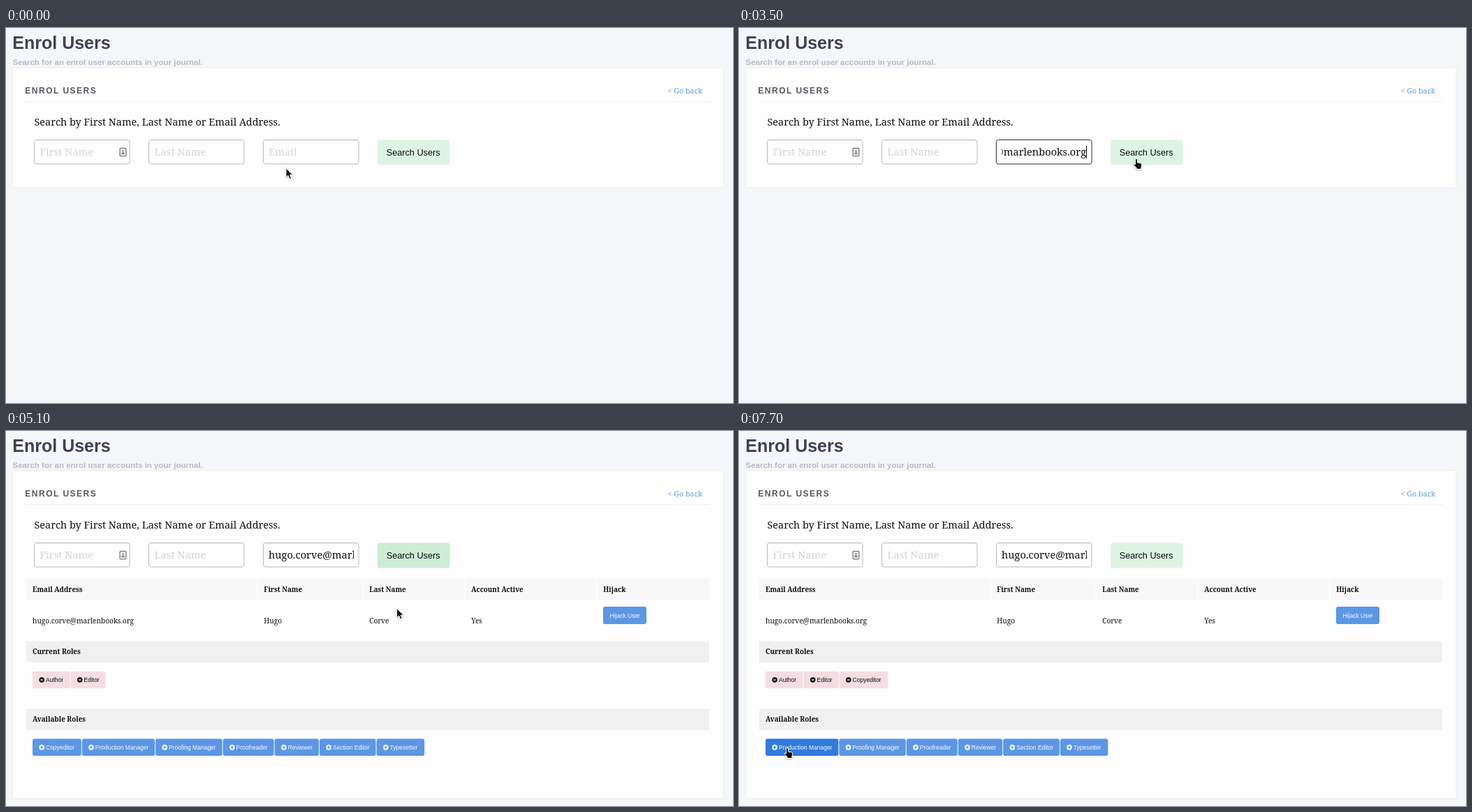
These frames come from a looping animation (1041x538 px, 8 s). An HTML page:

```html
<!DOCTYPE html>
<html lang="en">
<head>
<meta charset="utf-8">
<title>Enrol Users</title>
<style>
html, body { margin: 0; width: 100%; height: 100%; overflow: hidden; background: #f4f6fa; }
svg { display: block; width: 100%; height: 100%; }
text { white-space: pre; }
.sans { font-family: "Liberation Sans", Arial, sans-serif; }
.serif { font-family: "Noto Serif", serif; fill: #0f0f0f; }
.bold { font-weight: bold; }
.field { font-size: 14.6px; }
.hint { fill: #d3d3d8; }
.head { font-size: 9.8px; font-weight: bold; }
.cell { font-size: 10.15px; }
.small { font-size: 8.5px; }
.list { font-family: "Noto Sans", "Open Sans", sans-serif; font-size: 9.67px; fill: #333; }
</style>
</head>
<body>
<svg viewBox="0 0 1041 538" xmlns="http://www.w3.org/2000/svg">
  <defs>
    <filter id="soft" x="-20%" y="-20%" width="140%" height="150%">
      <feDropShadow dx="0" dy="1" stdDeviation="1.6" flood-color="#000" flood-opacity=".3"/>
    </filter>
    <filter id="glow" x="-10%" y="-30%" width="120%" height="160%">
      <feDropShadow dx="0" dy="0" stdDeviation="1.8" flood-color="#777" flood-opacity=".55"/>
    </filter>
    <filter id="faint" x="-3%" y="-5%" width="106%" height="110%">
      <feDropShadow dx="0" dy="0" stdDeviation="1.8" flood-color="#9aa4b8" flood-opacity=".22"/>
    </filter>
    <clipPath id="inner"><path d="M376 162H498V194H376Z"/></clipPath>
  </defs>
  <rect width="1041" height="538" fill="#f4f6fa"/>
  <text class="sans bold" x="9.3" y="30" font-size="25" fill="#3d4351">Enrol Users</text>
  <text class="sans bold" x="9.5" y="53" font-size="11.5" fill="#b7babf">Search for an enrol user accounts in your journal.</text>
  <rect id="card" x="10" y="57.5" width="1016.5" height="171" fill="#fefefe" filter="url(#faint)"/>
  <text class="sans bold" x="27.3" y="94" font-size="12" letter-spacing="1.5" fill="#55585f">ENROL USERS</text>
  <text class="serif" x="947.5" y="94" font-size="10.75" style="fill:#5f9fe3">&lt; Go back</text>
  <path d="M27.5 105.5H1008" stroke="#efefef"/>
  <text class="serif" x="40.5" y="140" font-size="14.45">Search by First Name, Last Name or Email Address.</text>
  <g id="form"></g>
  <g id="table"></g>
  <g id="popup"></g>
  <g id="cursor" stroke="#fff" fill="#111" filter="url(#soft)"><path stroke-width="1" stroke-linejoin="round"/></g>
</svg>
<script>
const LOOP = 8000, STEP = 100;
const FIRST = "hugo", LAST = "corve", LOGIN = FIRST + "." + LAST;
const EMAIL = LOGIN + "@marlenbooks.org";
const PALE = [222, 244, 227], MID = [180, 229, 191], DEEP = [170, 223, 181];

// Cursor moves: start, end, control point, end point (quadratic curve)
const START = [401, 201];
const MOVES = [
  [200, 900, [415, 200], [439, 186]],
  [2600, 2700, [438, 200], [436, 217]],
  [2900, 3500, [500, 235], [569, 188]],
  [3500, 3800, [575, 182], [578, 178]],
  [4800, 5600, [560, 300], [472, 414]],
  [5700, 6500, [300, 530], [69, 455]]
];
const ARROW = "M0 0V13.4L3 10.6L5.2 15.6L7.6 14.6L5.5 9.8H9.6Z";
const HAND = "M-1.5 1Q-1.5-.5 0-.5Q1.5-.5 1.5 1V5L6.4 6Q8 6.4 7.8 8L7 12V14.4H0V12.6L-4 8.6Q-4.5 6.8-3 7L-1.5 8Z";

const ROLES = [["Copyeditor", 69.8], ["Production Manager", 104.3], ["Proofing Manager", 95.5],
  ["Proofreader", 73], ["Reviewer", 63.4], ["Section Editor", 80.6], ["Typesetter", 68.6]];
const HELD = [["Author", 53.5], ["Editor", 50.1]];
const COLUMNS = [[29, 359.5, "Email Address", EMAIL], [361, 510.5, "First Name", "Hugo"],
  [512, 656.5, "Last Name", "Corve"], [658, 845, "Account Active", "Yes"], [847, 1007, "Hijack", ""]];

const $ = id => document.getElementById(id);
const rect = (x, y, w, h, fill, more = "") =>
  `<rect x="${x}" y="${y}" width="${w}" height="${h}" fill="${fill}" ${more}/>`;
const text = (x, y, cls, s, more = "") => `<text class="${cls}" x="${x}" y="${y}" ${more}>${s}</text>`;
const mix = (a, b, k) => `rgb(${a.map((v, i) => Math.round(v + (b[i] - v) * k))})`;
const clamp = v => Math.max(0, Math.min(1, v));

function pointer(t) {
  let from = START;
  for (const [t0, t1, mid, to] of MOVES) {
    if (t <= t0) break;
    const u = clamp((t - t0) / (t1 - t0)), k = u * u * (3 - 2 * u), r = 1 - k;
    from = from.map((v, i) => r * r * v + 2 * r * k * mid[i] + k * k * to[i]);
  }
  return from;
}

const inside = ([px, py], x, y, w, h) => px >= x && px <= x + w && py >= y && py <= y + h;

function inputBox(x, focus) {
  const ring = focus ? 'stroke="#444" filter="url(#glow)"' : 'stroke="#b9b9bd"';
  return rect(x, 160.5, 136.5, 34.5, "#fefefe", `rx="3" ${ring}`) +
    (focus ? "" : `<path d="M${x + 2} 161.7h132.5" stroke="#efeff1"/>`);
}

function contactIcon() {
  return rect(163.2, 172.6, 8.6, 11.2, "#fff", 'rx="1" stroke="#8b8b8b" stroke-width="1.6"') +
    '<circle cx="167.5" cy="176.2" r="1.3" fill="#8b8b8b"/>' +
    '<path d="M165.2 181.4v-2.2q2.3-2.2 4.6 0v2.2z" fill="#8b8b8b"/>';
}

function buttonColor(t) {
  if (t < 3500) return mix(PALE, PALE, 0);
  if (t < 4300) return mix(PALE, DEEP, clamp((t - 3500) / 300));
  if (t < 4500) return mix(MID, MID, 0);
  return mix(DEEP, PALE, clamp((t - 4900) / 300));
}

function typed(t) {
  if (t >= 3000) return EMAIL;
  return t < 1600 ? "" : FIRST.slice(0, Math.floor((t - 1600) / 100) + 1);
}

function drawForm(t) {
  const focus = t >= 900 && t < 4000, value = typed(t), end = focus && t >= 3000;
  let s = inputBox(40.5) + inputBox(204.5) + inputBox(368.5, focus) +
    text(48.5, 183, "serif field", "First Name", 'style="fill:#d3d3d8"') +
    text(212.5, 183, "serif field", "Last Name", 'style="fill:#d3d3d8"');
  if (t < 4300 || t >= 4500) s += contactIcon();
  s += value
    ? `<g clip-path="url(#inner)">${text(end ? 497 : 376, 183, "serif field", value,
        `id="value" text-anchor="${end ? "end" : "start"}"`)}</g>`
    : text(376, 183, "serif field", "Email", 'style="fill:#d3d3d8"');
  s += rect(532, 160.5, 103.5, 36, buttonColor(t), 'rx="3"') +
    text(544.7, 183, "sans", "Search Users", 'font-size="12.7" fill="#0a0a0a"');
  $("form").innerHTML = s;
  if (focus) {
    const x = end ? 497 : 376 + (value ? $("value").getComputedTextLength() : 0);
    $("form").insertAdjacentHTML("beforeend", rect(x, 169, 1, 18, "#111"));
  }
}

function roleRow(list, y, minus, at) {
  let x = 38, s = "", hit = false;
  for (const [name, w] of list) {
    const over = !minus && inside(at, x, y, w, 24.5);
    hit = hit || over;
    const fill = minus ? "#f6dde3" : over ? "#2f7bdd" : "#5b97e5";
    const ink = minus ? "#0a0a0a" : "#fefefe", cx = x + 13.2, cy = y + 12.3;
    s += rect(x, y, w, 24.5, fill, 'rx="3"') +
      `<circle cx="${cx}" cy="${cy}" r="3.8" fill="${ink}"/>` +
      `<path d="M${cx - 2.2} ${cy}h4.4${minus ? "" : `M${cx} ${cy - 2.2}v4.4`}" stroke="${fill}" stroke-width="1.3"/>` +
      text(x + 19, y + 15.3, "sans small", name, `fill="${ink}"`);
    x += w + 1;
  }
  return [s, hit];
}

function drawTable(t, at) {
  const shown = t >= 4300, added = t >= 7300;
  $("card").setAttribute("height", shown ? 469 : 171);
  if (!shown) {
    $("table").innerHTML = "";
    return false;
  }
  let s = "";
  for (const [x0, x1, title, value] of COLUMNS) {
    const x = x0 === 29 ? 38 : x0 + 8.3;
    s += rect(x0, 212, x1 - x0, 30.5, "#f8f8f8") + text(x, 231, "serif head", title) +
      text(x, 275.5, "serif cell", value);
  }
  s += rect(855, 252, 62, 25, "#5b97e5", 'rx="3"') + text(864.5, 267.7, "sans small", "Hijack User", 'fill="#fefefe"');
  for (const [y, title] of [[301.5, "Current Roles"], [398.5, "Available Roles"]])
    s += rect(29, y, 978, 30.5, "#f0f0f0") + text(38, y + 18.5, "serif head", title);
  const held = added ? [...HELD, ROLES[0]] : HELD;
  const [row, hit] = roleRow(added ? ROLES.slice(1) : ROLES, 441.6, false, at);
  $("table").innerHTML = s + roleRow(held, 344.8, true, at)[0] + row;
  return hit;
}

function drawPopup(t) {
  let s = "";
  if (t >= 1700 && t < 3000) {
    const rows = [LOGIN, LOGIN + "@marlenbooks..."];
    if (t < 1900) rows.push("hugin.author", "hugin.editor", "hugin.proofs", "hugin.reader");
    s = rect(367.5, 195.5, 136, rows.length * 16.3 + 1, "#fff", 'stroke="#bdbdbd" filter="url(#soft)"');
    rows.forEach((row, i) => {
      if (i === 1 && t >= 2700) s += rect(368, 212.3, 135, 16.2, "#d9d9d9");
      s += text(373, 208 + i * 16.3, "list", row);
    });
  }
  $("popup").innerHTML = s;
}

function draw(t) {
  const at = pointer(t);
  drawForm(t);
  const hit = drawTable(t, at);
  drawPopup(t);
  const hand = hit || inside(at, 532, 160, 104, 37);
  $("cursor").setAttribute("transform", `translate(${at[0].toFixed(1)} ${at[1].toFixed(1)})`);
  $("cursor").firstElementChild.setAttribute("d", hand ? HAND : ARROW);
}

const begin = performance.now();
let last = -1;
function tick() {
  const t = Math.floor(((performance.now() - begin) % LOOP) / STEP) * STEP;
  if (t !== last) draw(last = t);
  requestAnimationFrame(tick);
}
tick();
</script>
</body>
</html>
```
